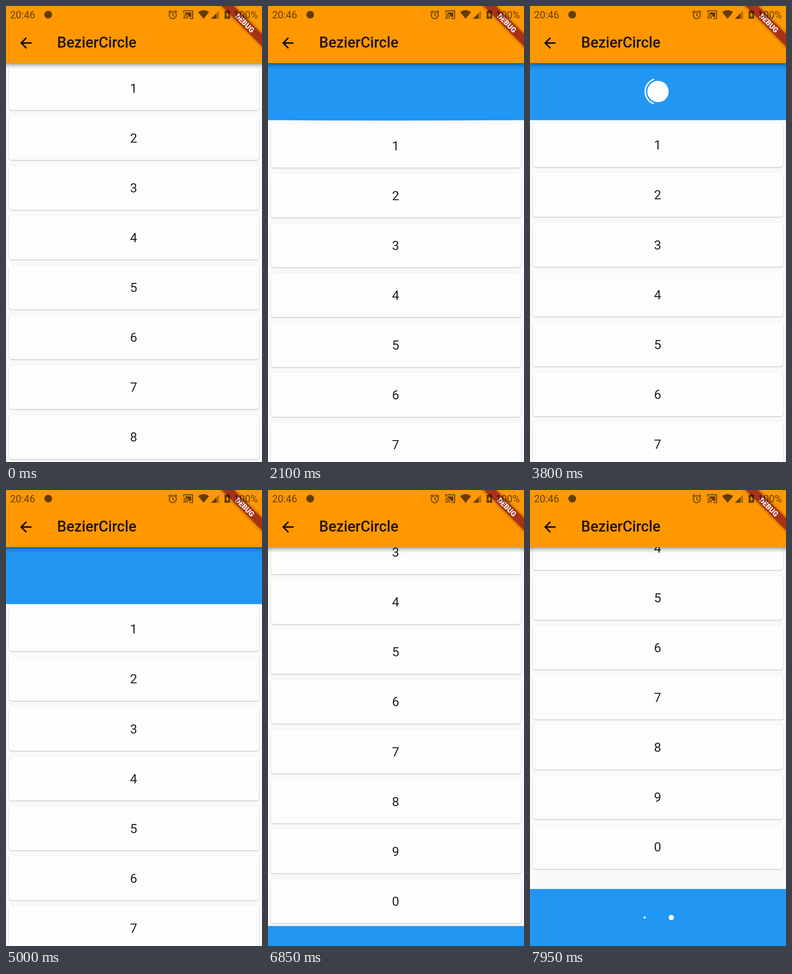
Recreate the animation shown at these times as an HTML page. Size 561 by 998 pixels, loop 8 s.

```html
<!DOCTYPE html>
<html lang="en">
<head>
<meta charset="utf-8">
<title>BezierCircle</title>
<style>
html, body { margin: 0; width: 100%; height: 100%; overflow: hidden; background: #f9f9f9; }
svg { display: block; width: 100vw; height: 100vh; font-family: Roboto, sans-serif; }
.card rect { fill: #fdfdfd; filter: drop-shadow(0 1.5px 1.2px rgba(0, 0, 0, .27)); }
.card text { font-size: 28px; text-anchor: middle; fill: #212121; }
.status { opacity: .6; font-size: 22px; }
</style>
</head>
<body>
<svg viewBox="0 0 561 998" preserveAspectRatio="none">
  <defs>
    <linearGradient id="shade" x2="0" y2="1">
      <stop offset="0" stop-opacity=".36"/>
      <stop offset=".45" stop-opacity=".13"/>
      <stop offset="1" stop-opacity="0"/>
    </linearGradient>
    <filter id="soft" x="-20%" y="-60%" width="140%" height="220%"><feGaussianBlur stdDeviation="3.5"/></filter>
  </defs>
  <rect width="561" height="998" fill="#f9f9f9"/>

  <path id="header" fill="#2196f3"/>
  <path id="bump" fill="#fdfdfd"/>
  <g id="loader" transform="translate(280.5 187.2)">
    <circle id="ball" fill="#fdfdfd"/>
    <path id="arc" fill="none" stroke="#fdfdfd" stroke-width="3.1"/>
  </g>

  <g id="list"></g>
  <path id="footer" fill="#2196f3"/>
  <g id="dots" fill="#fff"></g>
  <g id="bounce" fill="#fff"></g>

  <rect y="125" width="561" height="13" fill="url(#shade)"/>
  <rect width="561" height="125" fill="#ff9800"/>
  <path transform="translate(24.9 62.3) scale(1.558)" d="M20 11H7.8l5.6-5.6L12 4l-8 8 8 8 1.4-1.4L7.8 13H20z"/>
  <text x="112" y="91" font-size="32.3" font-weight="500" fill="#211400">BezierCircle</text>

  <g transform="translate(561 0) rotate(45)">
    <rect x="-75" y="43.6" width="150" height="18.7" opacity=".5" filter="url(#soft)"/>
    <rect x="-75" y="43.6" width="150" height="18.7" fill="#a93216"/>
    <text y="58.6" font-size="15.9" font-weight="900" text-anchor="middle" fill="#fff">DEBUG</text>
  </g>

  <g class="status">
    <text x="9" y="27">20:46</text>
    <text x="552" y="27" text-anchor="end">100%</text>
    <circle cx="92.500" cy="19" r="8.500"/>
    <g fill="none" stroke="#000" stroke-width="2">
      <circle cx="365.5" cy="20" r="7.8"/>
      <path d="M365.5 15v5.500l4 2.500M356 14l5-4.300M375 14l-5-4.300"/>
      <path d="M389.500 15v-4.500h19.500v17h-7M389 18.500a9 9 0 0 1 9 9M389 22.500a5 5 0 0 1 5 5"/>
    </g>
    <path d="M389 25v3h3a3 3 0 0 0-3-3zM393 14h13v10h-5a12 12 0 0 0-8-7z"/>
    <path d="M421 13.500q12-9 24 0L433 28z"/>
    <path d="M467 10v18h-18z" opacity=".45"/>
    <path d="M461 16v12h-12z"/>
    <path fill-rule="evenodd" d="M479 11h3.500V9h5v2h3.500v17h-12zM486 13l-4.500 7.500h3V26l4.500-8h-3z"/>
  </g>
</svg>
<script>
const LOOP = 8000, TOP = 125, WIDTH = 561, HEIGHT = 998, MID = WIDTH / 2;
const DP = WIDTH / 360, PITCH = 70 * DP, EXTENT = 80 * DP;
const FOOTER_TOP = HEIGHT - EXTENT;
const $ = id => document.getElementById(id);

// Tables of [ms, value], read with linear interpolation.
const SCROLL = [
  [930, 0], [1130, 52], [1330, 104], [1500, 133], [1650, 149.4], [1710, 151], [1800, 146],
  [1950, 132], [2100, 126], [2200, EXTENT], [5750, EXTENT], [5800, 107], [5850, 83.2],
  [5900, 59], [5950, 39], [6000, 23], [6100, 6], [6200, 0], [6300, 0], [6450, -80],
  [6690, -218], [6900, -275], [7100, -320], [7300, -345], [7600, -366], [7950, -380]
];
const SWING = [
  [2250, 0], [2500, -23], [2550, -21], [2750, 0], [2880, 11], [3010, 0], [3100, -6], [3200, 0]
];
const BALL = [[3150, 0], [3400, 15 * DP], [4650, 15 * DP], [4850, 0]];
const DOT_ALPHA = [[6700, 0], [7000, .25], [7150, .38], [7300, .13], [7350, 0]];
const LIFT = [[7300, 1], [7400, 0]];

function sample(table, t) {
  const i = table.findIndex(([time]) => time > t);
  if (i < 0) return table[table.length - 1][1];
  if (i === 0) return table[0][1];
  const [t0, a] = table[i - 1], [t1, b] = table[i];
  return a + (b - a) * (t - t0) / (t1 - t0);
}

const clamp = x => Math.min(1, Math.max(0, x));

// cubic-bezier(.4, 0, .2, 1)
function ease(x) {
  let lo = 0, hi = 1, u = .5;
  for (let i = 0; i < 20; i++) {
    u = (lo + hi) / 2;
    const bx = 1.2 * u * (1 - u) ** 2 + .6 * u * u * (1 - u) + u ** 3;
    if (bx < x) lo = u; else hi = u;
  }
  return u * u * (3 - 2 * u);
}

function add(parent, tag, attrs) {
  const el = document.createElementNS('http://www.w3.org/2000/svg', tag);
  set(el, attrs);
  return parent.appendChild(el);
}

function set(el, attrs) {
  for (const name in attrs) el.setAttribute(name, attrs[name]);
}

for (let i = 0; i < 10; i++) {
  const card = add($('list'), 'g', { class: 'card', transform: `translate(0 ${TOP + i * PITCH})` });
  add(card, 'rect', { x: 4 * DP, y: 4 * DP, width: WIDTH - 8 * DP, height: 62 * DP, rx: 4 * DP });
  add(card, 'text', { x: 279.7, y: PITCH / 2 + 10.2 }).textContent = (i + 1) % 10;
}
const dots = [-2, -1, 0, 1, 2].map(n => ({ n, el: add($('dots'), 'circle', { cy: 935.7, r: 10 }) }));
const bounces = [0, 1, 2].map(n =>
  add($('bounce'), 'circle', { cx: MID + (n - 1) * 18.75 * DP, cy: 935.7 }));

function drawHeader(t, offset) {
  const edge = TOP + Math.min(EXTENT, Math.max(0, offset));
  const sag = t < 2200 ? Math.max(0, offset - EXTENT) * .89 : sample(SWING, t);
  const curve = `Q${MID} ${edge + 2 * sag} 0 ${edge}`;
  set($('header'), { d: offset > 0 ? `M0 ${TOP}H${WIDTH}V${edge}${curve}z` : '' });
  set($('bump'), { d: sag < 0 ? `M${WIDTH} ${edge}${curve}z` : '' });
}

function drawLoader(t) {
  set($('ball'), { r: sample(BALL, t) });
  const cycles = (t + 1772) / (6665 / 5);
  const step = Math.floor(cycles) % 5, phase = cycles % 1;
  const head = ease(clamp(phase * 2)), tail = ease(clamp(phase * 2 - 1));
  const start = Math.PI * (-.5 + tail * 1.5 + phase * 1.7 - step * .8);
  const end = start + Math.max(.001, (head - tail) * 1.5 * Math.PI);
  const r = 18 * DP, point = a => `${r * Math.cos(a)} ${r * Math.sin(a)}`;
  const visible = t >= 3400 && t < 4650;
  set($('arc'), {
    d: visible ? `M${point(start)}A${r} ${r} 0 ${end - start > Math.PI ? 1 : 0} 1 ${point(end)}` : ''
  });
}

function drawFooter(t, offset) {
  const bottom = TOP + 10 * PITCH + offset;
  const edge = Math.max(FOOTER_TOP, bottom);
  const lift = Math.max(0, FOOTER_TOP - bottom) * sample(LIFT, t);
  set($('footer'), {
    d: edge < HEIGHT ? `M0 ${HEIGHT}V${edge}Q${MID} ${edge - 2 * lift} ${WIDTH} ${edge}V${HEIGHT}z` : ''
  });
  const spread = clamp((HEIGHT - bottom) / EXTENT) * 66;
  const alpha = sample(DOT_ALPHA, t);
  for (const { n, el } of dots) {
    set(el, { cx: MID + n * spread, opacity: alpha * (1 - Math.abs(n) * .42) });
  }
  bounces.forEach((el, n) => {
    const wave = Math.sin(2 * Math.PI * ((t - 6690) / 1400 - n * .2));
    set(el, { r: t >= 7400 ? 7.5 * DP * (wave + 1) / 2 : 0 });
  });
}

function draw(t) {
  const offset = sample(SCROLL, t);
  set($('list'), { transform: `translate(0 ${offset})` });
  drawHeader(t, offset);
  drawLoader(t);
  drawFooter(t, offset);
}

const begin = performance.now();
function tick() {
  draw((performance.now() - begin) % LOOP);
  requestAnimationFrame(tick);
}
tick();
</script>
</body>
</html>
```
